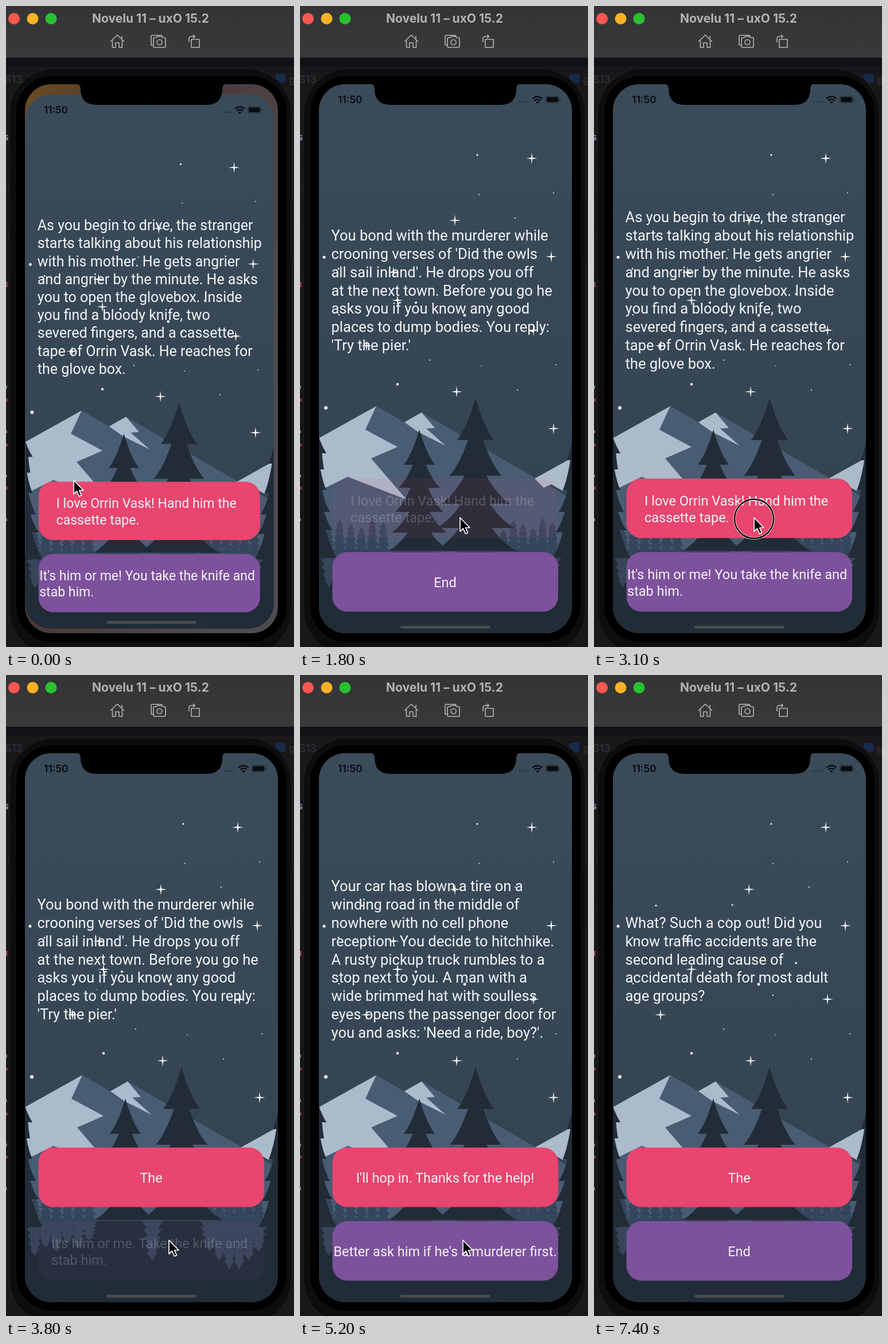
Write an HTML page that moves like this. It is 502 px wide and 1115 px high and loops after 7500 ms.

```html
<!DOCTYPE html>
<html lang="en">
<head>
<meta charset="utf-8">
<title>Story game</title>
<style>
  html, body { margin: 0; width: 100%; height: 100%; overflow: hidden; background: #1a171b; }
  svg { display: block; width: 100vw; height: 100vh; }
  text { white-space: pre; }
  .tale, .label { font-family: Roboto, "Liberation Sans", sans-serif; fill: #f3f4f6; }
  .tale { font-size: 25.5px; }
  .label { font-size: 23.5px; }
  .ui { font-family: Inter, sans-serif; font-weight: 600; }
</style>
</head>
<body>
<svg viewBox="0 0 502 1115">
  <defs>
    <linearGradient id="sky" x2="0" y2="1">
      <stop stop-color="#3a4b5a"/><stop offset=".6" stop-color="#364654"/><stop offset="1" stop-color="#334250"/>
    </linearGradient>
    <linearGradient id="lake" x2="0" y2="1">
      <stop stop-color="#212c37"/><stop offset="1" stop-color="#202c37"/>
    </linearGradient>
    <linearGradient id="wall" x2="1" y2=".6">
      <stop stop-color="#6b4d22"/><stop offset=".35" stop-color="#4b3433"/><stop offset="1" stop-color="#4e4c50"/>
    </linearGradient>
    <linearGradient id="bar" x2="0" y2="1">
      <stop stop-color="#343436"/><stop offset="1" stop-color="#39393b"/>
    </linearGradient>
    <clipPath id="glass"><rect x="33" y="136" width="441" height="955" rx="46"/></clipPath>
    <clipPath id="window"><rect id="frame" rx="44"/></clipPath>
  </defs>

  <!-- desktop behind the simulator -->
  <rect width="502" height="1115" fill="#1a171b"/>
  <rect y="90" width="502" height="15" fill="#131116"/>
  <g class="ui" font-size="18" fill="#302e32">
    <text x="-2" y="134">S13</text><text x="493" y="134">g</text>
    <text x="-5" y="234" fill="#7e99a8">s</text>
  </g>
  <rect x="470" y="118" width="17" height="16" rx="3" fill="#172a4a"/>
  <path d="M0 248h4v34h-4M0 314h4v66h-4M0 402h4v60h-4" fill="none" stroke="#29262b"/>
  <path d="M0 480v9M0 683v5M0 761v5M0 836v5" stroke="#9d3c57" stroke-width="5"/>
  <path d="M0 660v6M0 738v5M0 815v5M0 891v5" stroke="#9b8588" stroke-width="3"/>

  <!-- phone body -->
  <rect x="6" y="109" width="492" height="1020" rx="78" fill="#0d0d0f" stroke="#1b1b1e" stroke-width="2"/>
  <path d="M5 250v34M5 326v62M5 406v62M498 340v98" stroke="#161618" stroke-width="4"/>
  <rect x="18" y="122" width="471" height="984" rx="62"/>

  <g clip-path="url(#glass)">
    <rect x="33" y="136" width="441" height="955" fill="url(#wall)"/>
    <g clip-path="url(#window)">
      <g id="app">
        <rect x="20" y="100" width="480" height="900" fill="url(#sky)"/>
        <path fill="#485c74" d="M20 759L133 696 182 724 212 707 490 867V950H20z"/>
        <g fill="#abbbcb">
          <path d="M20 759L133 696 114 737 170 767 124 787 192 866H20z"/>
          <path d="M182 724L212 707 235 734 220 735 254 765 206 741z"/>
          <path d="M409 822L490 777V835L457 843 438 832 425 838z"/>
        </g>
        <path fill="#485c74" d="M20 850L83 819 195 862 300 950H20z"/>
        <g id="grove" fill="#34465b"></g>
        <rect x="20" y="949" width="480" height="180" fill="url(#lake)"/>
        <g id="mirror" fill="#364559" transform="translate(0,1898) scale(1,-1)"></g>
        <g id="firs" fill="#212c37"></g>
        <g id="stars" fill="#fff"></g>
        <g id="tale" class="tale"></g>
        <g id="buttons"></g>
        <g fill="#080c10">
          <text class="ui" x="66" y="169" font-size="17.500">11:50</text>
          <path d="M381 167h3m2 0h3m2 0h3m2 0h3" stroke="#293642" stroke-width="3"/>
          <path d="M405.500 161q8.500-7 17 0M408.500 164.500q5.500-4.500 11 0" fill="none" stroke="#080c10" stroke-width="2.400"/>
          <path d="M411 167q3-2 6 0l-3 3z"/>
          <rect x="428.500" y="157" width="23" height="11.500" rx="3.500" fill="none" stroke="#202b35"/>
          <rect x="430" y="158.500" width="20" height="8.500" rx="2"/>
          <path d="M453 161q2 2 0 4z"/>
        </g>
      </g>
    </g>
    <rect id="home" x="175" width="157" height="5" rx="2.500" fill="#494b50"/>
  </g>
  <path d="M122 135q8 1 8 9q0 28 28 28H349q28 0 28-28q0-8 8-9z"/>

  <!-- simulator title bar -->
  <rect width="502" height="90" fill="url(#bar)"/>
  <circle cx="14" cy="22" r="10" fill="#fc5750"/>
  <circle cx="46.500" cy="22" r="10" fill="#fdb225"/>
  <circle cx="78.500" cy="22" r="10" fill="#28c231"/>
  <text class="ui" x="252" y="29" font-size="21" text-anchor="middle" fill="#b3b3b5" style="font-weight:700">Novelu 11 – uxO 15.2</text>
  <g fill="none" stroke="#b4b4b6" stroke-width="1.600" stroke-linejoin="round">
    <path d="M182 62L194 50.500 206 62M185.500 60V72H191V64h6v8h5.500V60M202 57v-5"/>
    <path d="M257 68h-4V53q0-2 2-2h15q2 0 2 2M257 57q0-2 2-2h3l2-2h7l2 2h3q2 0 2 2v13q0 2-2 2h-17q-2 0-2-2z"/>
    <circle cx="267.500" cy="63" r="4.500"/>
    <path d="M323 58h14v14h-14zM319 63V57q0-4 4-4h6M326 50l3.500 3-3.500 3"/>
  </g>

  <g id="ring" fill="none">
    <circle r="34" stroke="#fff" stroke-width="4"/><circle r="34" stroke="#000" stroke-width="2.400"/>
  </g>
  <path id="cursor" d="M0 0V24L5.500 19 9.500 28 13.500 26.300 9.600 17.500H17z" stroke="#fff" stroke-width="1.700" stroke-linejoin="round"/>
</svg>
<script>
const $ = id => document.getElementById(id);
const clamp = v => Math.max(0, Math.min(1, v));
const mix = (a, b, k) => a + (b - a) * k;

// Conifer outline: apex, then one [y, half width] pair per tier
function fir(x, top, tiers, notch = .42) {
  const side = s => tiers.map(([y, w], i) => {
    const [py, pw] = i ? [tiers[i - 1][0], tiers[i - 1][1] * notch] : [top, 0];
    return { in: [x + s * pw, py], bend: [x + s * mix(pw, w, .45), mix(py, y, .68)], tip: [x + s * w, y] };
  });
  let d = `M${x} ${top}`;
  for (const p of side(-1)) d += `L${p.in}Q${p.bend} ${p.tip}`;
  for (const p of side(1).reverse()) d += `L${p.tip}Q${p.bend} ${p.in}`;
  return `<path d="${d}z"/>`;
}
const small = (x, base, h, w) =>
  fir(x, base - h, [1, 2, 3, 4, 5].map(i => [base - h * (1 - i / 5), w * (.4 + .12 * i)]), .55);

$('firs').innerHTML =
  fir(306, 682, [[755, 32], [817, 45], [866, 60], [908, 68], [948, 72]]) +
  fir(208, 737, [[798, 27], [838, 36], [880, 42], [916, 48], [948, 54]]) +
  fir(24, 720, [[778, 22], [806, 18], [842, 22], [880, 28], [912, 33], [960, 40]], .65) +
  fir(486, 700, [[790, 21], [842, 28], [880, 35], [915, 40], [960, 46]], .7);

let grove = '', mirror = '';
for (let i = 0; i < 6; i++) {
  const left = 50 + i * 19, right = 355 + i * 17;
  for (const x of [left, right]) grove += small(x, 950, 40 + (i * 17) % 24, 13);
  mirror += small(left, 949, 62 - i * 3 - i % 2 * 12, 17);
  mirror += small(right, 949, 94 - Math.abs(i - 2.5) * 16, 19);
}
$('grove').innerHTML = grove;
$('mirror').innerHTML = mirror + small(255, 949, 70, 20);

const sparkles = [[404, 265], [270, 373], [438, 436], [163, 463], [170, 512], [407, 564], [116, 591], [273, 671], [442, 735]];
const dots = [[309, 259, 1.6], [312, 328, .9], [442, 325, .9], [375, 369, 1.1], [108, 401, 1.6], [241, 400, 1.4],
  [42, 437, 2.5], [67, 457, 1.4], [234, 424, 1], [352, 501, 1.8], [202, 516, 2], [68, 537, 1.2], [158, 547, .8],
  [287, 538, 2.4], [312, 557, 1.2], [226, 616, 1], [316, 626, .8], [446, 624, .9], [170, 658, 2.2], [379, 668, 1], [45, 699, 3]];
$('stars').innerHTML =
  sparkles.map(([x, y]) => `<path d="M${x} ${y - 10}l1.200 8.800 8.800 1.200-8.800 1.200-1.200 8.800-1.200-8.800-8.800-1.200 8.800-1.200z"/>`).join('') +
  dots.map(([x, y, r]) => `<circle cx="${x}" cy="${y}" r="${r}"/>`).join('');

const tales = {
  drive: `As you begin to drive, the stranger
starts talking about his relationship
with his mother. He gets angrier
and angrier by the minute. He asks
you to open the glovebox. Inside
you find a bloody knife, two
severed fingers, and a cassette
tape of Orrin Vask. He reaches for
the glove box.`,
  bond: `You bond with the murderer while
crooning verses of 'Did the owls
all sail inland'. He drops you off
at the next town. Before you go he
asks you if you know any good
places to dump bodies. You reply:
'Try the pier.'`,
  car: `Your car has blown a tire on a
winding road in the middle of
nowhere with no cell phone
reception. You decide to hitchhike.
A rusty pickup truck rumbles to a
stop next to you. A man with a
wide brimmed hat with soulless
eyes opens the passenger door for
you and asks: 'Need a ride, boy?'.`,
  cop: `What? Such a cop out! Did you
know traffic accidents are the
second leading cause of
accidental death for most adult
age groups?`
};

// Labels: text and, when two lines long, the left edge
const tape = ['I love Orrin Vask! Hand him the\ncassette tape.', 88];
const end = [['The'], ['End']];
const labels = {
  drive: [tape, ["It's him or me! You take the knife and\nstab him.", 58]],
  car: [["I'll hop in. Thanks for the help!"], ["Better ask him if he's a murderer first."]],
  bond: end,
  cop: end
};
// A held button falls back to its default label
const held = [tape, ["It's him or me. Take the knife and\nstab him.", 79]];

// Time of the click, button, tale it leads to
const presses = [
  [-999, 0, 'drive'], [1000, 0, 'bond'], [1700, 0, 'car'], [2500, 0, 'drive'],
  [3100, 0, 'bond'], [3700, 1, 'car'], [5700, 1, 'cop']
];
const dip = [1, .08, .22, .6, .85];

function button(i, fill, fillAlpha, [text, left], textAlpha) {
  const y = i ? 950 : 822, lines = text.split('\n'), two = lines.length > 1;
  const rows = lines.map((s, n) => `<text x="${two ? left : 253}" y="${y + (two ? 47 + n * 29 : 61)}">${s}</text>`).join('');
  return `<rect x="56.500" y="${y}" width="393.500" height="103.500" rx="26" fill="${fill}" fill-opacity="${fillAlpha}"/>
    <g class="label" text-anchor="${two ? 'start' : 'middle'}" opacity="${textAlpha}">${rows}</g>`;
}

const track = [[0, 118, 825], [200, 118, 825], [800, 279, 890], [3300, 279, 890], [3600, 284, 983], [7500, 284, 983]];
function pointer(t) {
  const i = track.findIndex(p => p[0] > t), a = track[i - 1], b = track[i];
  let k = (t - a[0]) / (b[0] - a[0]);
  k = k * k * (3 - 2 * k);
  return [mix(a[1], b[1], k), mix(a[2], b[2], k)];
}

function draw(t) {
  // launch zoom
  const q = (1 - clamp(t / 600)) ** 2;
  $('app').setAttribute('transform', `translate(${1.3 * q},${21 * q}) scale(${1 - .019 * q})`);
  const box = { x: 33 + .5 * q, y: 136 + 18 * q, width: 441 - 7.5 * q, height: 955 - 26 * q };
  for (const k in box) $('frame').setAttribute(k, box[k]);
  $('home').setAttribute('y', 1078 - 8.5 * q);

  const n = presses.findLastIndex(p => p[0] <= t), [at, hit, to] = presses[n];
  const from = n ? presses[n - 1][2] : to, u = t - at;

  const lines = tales[u < 200 ? from : to].split('\n'), top = 503.5 - (lines.length - 1) * 15.9;
  $('tale').innerHTML = lines.map((s, i) => `<text x="54.500" y="${top + i * 31.8}">${s}</text>`).join('');

  $('buttons').innerHTML = ['#e8456f', '#7d519c'].map((fill, i) => {
    const alpha = i === hit ? dip[u / 100] ?? 1 : 1;
    if (u >= 300) return button(i, fill, alpha, labels[to][i], clamp((u - 300) / 250));
    return i === hit && u >= 100 ? button(i, fill, alpha, held[i], .2) : button(i, fill, alpha, labels[from][i], 1);
  }).join('');

  const [x, y] = pointer(t);
  $('cursor').setAttribute('transform', `translate(${x},${y})`);
  $('cursor').style.display = t < 6900 ? '' : 'none';
  $('ring').setAttribute('transform', `translate(${x},${y + 2})`);
  $('ring').style.display = u < 100 ? '' : 'none';
}

let shown = -1;
const start = performance.now();
function tick() {
  const t = Math.floor((performance.now() - start) % 7500 / 100) * 100;
  if (t !== shown) draw(shown = t);
  requestAnimationFrame(tick);
}
tick();
</script>
</body>
</html>
```
